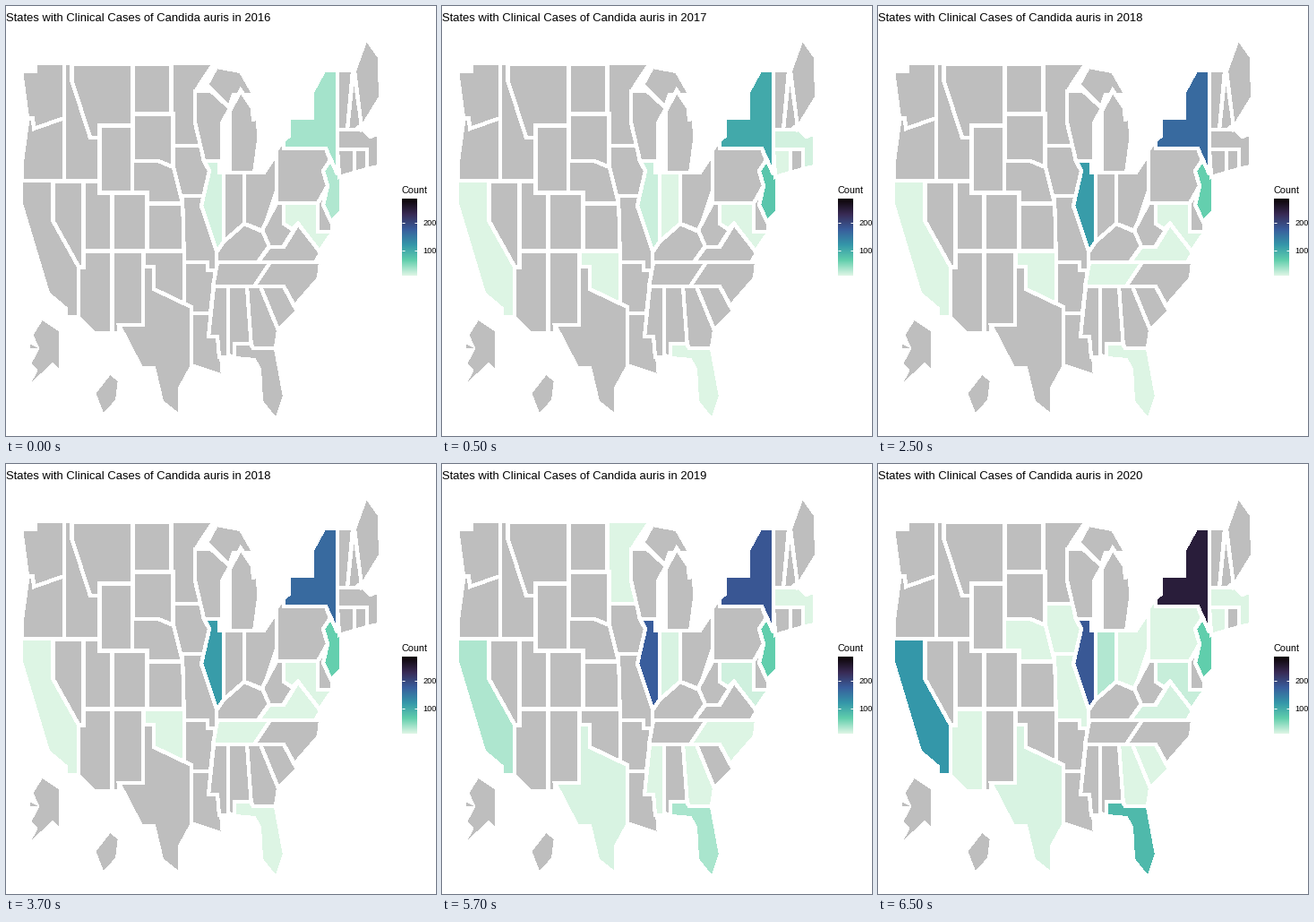
A matplotlib script that plays this animation: 480x480 px, repeating every 8000 ms.

```python
import matplotlib.pyplot as plt
from matplotlib.animation import FuncAnimation
from matplotlib.colors import LinearSegmentedColormap, Normalize
from matplotlib.patches import Polygon

SIZE, DPI = 480, 80
PX = 72 / DPI
INTERVAL, FRAMES = 500, 16
MISSING = "#bebebe"

plt.rcParams["font.family"] = "Liberation Sans"
fig = plt.figure(figsize=(SIZE / DPI, SIZE / DPI), dpi=DPI, facecolor="white")
ax = fig.add_axes([0, 0, 1, 1])

mako = LinearSegmentedColormap.from_list("mako_reversed", [
    "#def5e5", "#60ceac", "#3497a9", "#395d9c", "#382a54", "#0b0405"], N=512)
scale = Normalize(1, 284)

# States with very few cases, then those with a visible count
FEW = {2016: "MD", 2017: "CA OK FL IN MD CT", 2018: "CA OK FL TN VA MD",
       2019: "MN MA MS NC GA", 2020: "AZ NE IA MO OH MA CT GA SC PA"}
COUNTS = {
    2016: dict(NY=27, NJ=22, IL=6),
    2017: dict(NY=96, NJ=66, IL=10, MA=7),
    2018: dict(NY=158, IL=109, NJ=56),
    2019: dict(NY=178, IL=171, NJ=57, CA=23, FL=25, MD=8, IN=4, TX=4),
    2020: dict(NY=246, IL=176, CA=114, FL=80, NJ=58, IN=21, MD=12, VA=5, TX=4),
}

shapes = []


def state(code, *corners):
    patch = Polygon(corners, facecolor=MISSING, edgecolor="white",
                    linewidth=3.2 * PX, joinstyle="miter", antialiased=False)
    ax.add_patch(patch)
    shapes.append((code, patch))


def box(code, left, top, right, bottom):
    state(code, (left, top), (right, top), (right, bottom), (left, bottom))


def label(x, y, text, px):
    return ax.text(x, y, text, fontsize=px * PX, ha="left", va="baseline")


# Later states cover earlier ones, so each shared border is given once.
# West
box("OR", 17, 120, 65, 195)
state("WA", (17, 73), (33, 73), (33, 64), (65, 64), (65, 125), (31, 137),
      (30, 125), (24, 125), (17, 176))
shapes.pop()[1].remove()
shapes.pop()[1].remove()
state("OR", (24, 125), (65, 125), (65, 195), (17, 195), (17, 176))
state("WA", (17, 73), (33, 73), (33, 64), (65, 64), (65, 125), (31, 137),
      (30, 125), (24, 125))
box("MT", 73, 64, 141, 147)
state("ID", (65, 64), (73, 64), (73, 82), (94, 147), (104, 147), (104, 195),
      (65, 195))
state("AZ", (80, 273), (118, 273), (118, 365), (98, 365), (80, 347))
box("NV", 52, 195, 86, 291)
state("CA", (17, 195), (52, 195), (52, 239), (81, 291), (81, 347), (67, 347),
      (67, 338), (47, 321), (17, 221))
box("UT", 86, 195, 118, 273)
box("WY", 104, 133, 141, 208)
state("NM", (118, 273), (153, 273), (153, 356), (126, 356), (126, 365), (118, 365))
state("AK", (40, 348), (61, 362), (61, 410), (52, 401), (20, 431), (33, 407),
      (26, 399), (34, 384), (25, 384), (25, 374), (33, 378), (28, 367))
state("HI", (116, 409), (127, 418), (124, 441), (108, 458), (98, 432))

# Plains and south centre
state("MN", (184, 64), (232, 64), (211, 96), (217, 156), (186, 156))
state("IA", (186, 156), (217, 156), (227, 184), (222, 212), (186, 212))
box("SD", 141, 120, 186, 181)
box("ND", 141, 64, 184, 120)
state("NE", (141, 173), (170, 173), (187, 180), (197, 220), (141, 220))
box("CO", 118, 208, 157, 273)
box("KS", 157, 220, 198, 273)
box("OK", 153, 273, 199, 335)
state("AR", (199, 286), (235, 286), (228, 343), (199, 343))
state("MO", (197, 212), (222, 212), (219, 223), (236, 272), (235, 295),
      (225, 295), (225, 286), (199, 286))
state("LA", (207, 343), (236, 343), (242, 413), (206, 401))
state("TX", (153, 291), (165, 291), (165, 316), (207, 336), (207, 403),
      (194, 427), (194, 458), (174, 442), (165, 404), (151, 404), (126, 356),
      (153, 356))

# Great Lakes
state("WI", (211, 95), (229, 95), (250, 114), (241, 131), (241, 173),
      (221, 173), (211, 130))
state("MI", (224, 88), (235, 68), (262, 73), (277, 99), (254, 99), (249, 113))
state("MI", (250, 187), (250, 117), (262, 94), (275, 114), (276, 128),
      (281, 116), (282, 151), (277, 187))
state("OH", (266, 186), (288, 186), (303, 163), (302, 207), (287, 251), (266, 243))
state("IN", (243, 186), (266, 186), (266, 243), (243, 263))
state("IL", (221, 173), (238, 173), (238, 186), (243, 186), (243, 263),
      (236, 276), (218, 223), (227, 184))

# South
state("KY", (235, 286), (235, 275), (243, 263), (266, 243), (287, 252),
      (294, 268), (281, 286))
state("TN", (236, 286), (295, 286), (277, 313), (231, 313))
state("MS", (232, 313), (248, 313), (248, 392), (238, 392), (236, 369), (226, 369))
state("AL", (248, 313), (269, 313), (274, 378), (255, 392), (248, 390))
state("GA", (269, 313), (284, 313), (304, 362), (301, 382), (274, 382))
state("FL", (255, 377), (273, 377), (276, 382), (301, 382), (311, 436),
      (302, 463), (285, 442), (283, 406), (277, 395), (255, 393))
state("SC", (284, 313), (310, 313), (325, 341), (304, 362))
state("NC", (295, 286), (351, 286), (349, 304), (322, 335), (310, 313), (277, 313))
state("WV", (302, 220), (310, 220), (326, 243), (309, 269), (294, 269), (286, 250))
state("VA", (326, 243), (352, 275), (345, 286), (281, 286), (294, 269), (310, 269))

# Northeast
state("MD", (310, 220), (348, 220), (348, 252), (365, 252), (350, 274),
      (326, 243), (319, 249), (310, 243))
state("DE", (348, 220), (355, 207), (364, 238), (364, 252), (348, 252))
state("PA", (302, 160), (310, 151), (357, 159), (362, 172), (359, 201),
      (348, 220), (302, 220))
state("NJ", (362, 172), (374, 188), (374, 230), (363, 241), (354, 222),
      (359, 201), (354, 184))
state("MA", (370, 138), (399, 138), (407, 146), (416, 142), (416, 179),
      (403, 182), (370, 160))
state("CT", (370, 160), (389, 160), (389, 186), (372, 191))
state("RI", (389, 160), (403, 160), (403, 182), (389, 186))
state("NY", (310, 159), (310, 150), (316, 145), (316, 125), (342, 125),
      (342, 96), (355, 72), (370, 72), (370, 188), (357, 159))
state("VT", (370, 72), (387, 72), (381, 138), (370, 138))
state("NH", (388, 72), (397, 133), (390, 138), (381, 138))
state("ME", (389, 72), (402, 36), (417, 57), (418, 102), (397, 136))

# Legend
ax.imshow([[i / 255] for i in range(255, -1, -1)], cmap=mako, vmin=0, vmax=1,
          extent=(442, 459, 301, 215), aspect="auto", interpolation="bilinear")
label(442, 209, "Count", 10.8)
for value in (100, 200):
    y = 303.5 - 0.31 * value
    label(465, y + 3.5, str(value), 9.2)
    for x in (442, 455.6):
        ax.plot([x, x + 3.4], [y, y], color="white", lw=PX, solid_capstyle="butt")

title = label(0, 17, "", 13)
ax.set(xlim=(0, SIZE), ylim=(SIZE, 0))
ax.axis("off")


def draw(frame):
    year = 2016 + (frame + 3) // 4
    title.set_text(f"States with Clinical Cases of Candida auris in {year}")
    counts = dict.fromkeys(FEW[year].split(), 2) | COUNTS[year]
    for code, patch in shapes:
        patch.set_facecolor(mako(scale(counts[code])) if code in counts else MISSING)
    return [title] + [patch for _, patch in shapes]


anim = FuncAnimation(fig, draw, frames=FRAMES, interval=INTERVAL,
                     repeat=True, repeat_delay=0)
plt.show()
```
